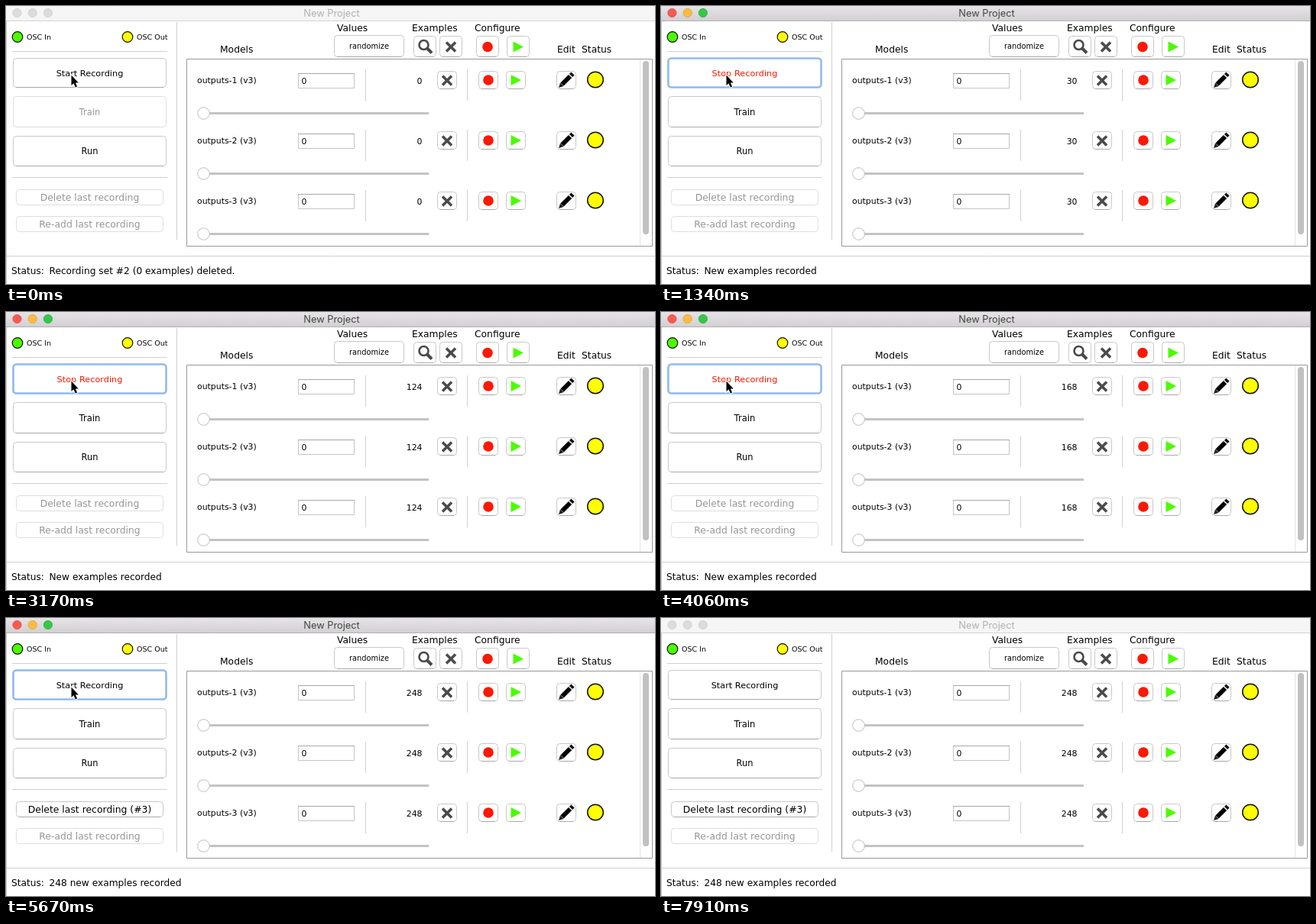
Write an HTML page with a canvas that moves like this. It is 849 by 364 pixels and loops after 8 s.

```html
<!DOCTYPE html>
<html>
<head>
<meta charset="utf-8">
<title>New Project</title>
<style>
  html, body { margin: 0; width: 100%; height: 100%; overflow: hidden; background: #fff; }
  canvas { display: block; }
</style>
</head>
<body>
<canvas id="stage" width="849" height="364"></canvas>
<script>
const ctx = document.getElementById('stage').getContext('2d');
const LOOP = 8000, START = 810, STOP = 5670, FRAME = 88;
const SANS = '"DejaVu Sans", sans-serif', TITLE = 'Inter, sans-serif';
const RED = '#fa1900', GREEN = '#4bfc00', YELLOW = '#ffff00', DARK = '#4a4a4a';

function text(str, x, y, size, color = '#000', align = 'left', family = SANS) {
  ctx.font = `${size}px ${family}`;
  ctx.textAlign = align;
  ctx.fillStyle = color;
  ctx.fillText(str, x, y);
}

function path(points, closed) {
  ctx.beginPath();
  points.forEach(([x, y]) => ctx.lineTo(x, y));
  if (closed) ctx.closePath();
}

function line(x1, y1, x2, y2, color = '#d0d0d0', width = 1) {
  path([[x1, y1], [x2, y2]]);
  ctx.strokeStyle = color;
  ctx.lineWidth = width;
  ctx.stroke();
}

function circle(x, y, r, fill, stroke, width = 1) {
  ctx.beginPath();
  ctx.arc(x, y, r, 0, 2 * Math.PI);
  if (fill) { ctx.fillStyle = fill; ctx.fill(); }
  if (stroke) { ctx.strokeStyle = stroke; ctx.lineWidth = width; ctx.stroke(); }
}

function box(x, y, w, h, r, fill, stroke, width = 1) {
  ctx.beginPath();
  ctx.roundRect(x, y, w, h, r);
  if (fill) { ctx.fillStyle = fill; ctx.fill(); }
  if (stroke) { ctx.strokeStyle = stroke; ctx.lineWidth = width; ctx.stroke(); }
}

function button(x, y, w, h, enabled = true) {
  box(x + .5, y + .5, w - 1, h - 1, 4, '#fff', enabled ? '#c8c8c8' : '#dedede');
  if (enabled) line(x + 4, y + h - .5, x + w - 4, y + h - .5, '#a8a8a8');
}

function labelButton(label, x, y, w, h, size, enabled, color = '#000') {
  button(x, y, w, h, enabled);
  text(label, x + w / 2, y + h / 2 + size * .36, size, enabled ? color : '#959595', 'center');
}

function crossIcon(x, y) {
  line(x - 6, y - 6, x + 6, y + 6, DARK, 3.6);
  line(x + 6, y - 6, x - 6, y + 6, DARK, 3.6);
}

function playIcon(x, y) {
  path([[x - 6.5, y - 7], [x + 7, y], [x - 6.5, y + 7]], true);
  ctx.fillStyle = GREEN;
  ctx.fill();
}

function searchIcon(x, y) {
  circle(x - 1.5, y - 2, 6, null, DARK, 2.6);
  line(x + 3, y + 2.5, x + 9, y + 8.5, DARK, 4);
}

function pencilIcon(x, y) {
  line(x - 5.5, y + 5.5, x + 5, y - 5, '#000', 6);
  line(x + 6, y - 6, x + 8.5, y - 8.5, '#111', 6);
  path([[x - 10, y + 10], [x - 8, y + 3.5], [x - 3.5, y + 8]], true);
  ctx.fillStyle = '#222';
  ctx.fill();
}

function titleBar(active) {
  const shade = ctx.createLinearGradient(0, 0, 0, 19);
  shade.addColorStop(0, active ? '#e6e4e6' : '#f6f6f6');
  shade.addColorStop(1, active ? '#d2d0d2' : '#f5f5f5');
  ctx.fillStyle = shade;
  ctx.fillRect(0, 0, 849, 19);
  line(0, 19.5, 849, 19.5, active ? '#b2b0b2' : '#d4d4d4');
  const lights = active ? ['#fc5753', '#fdbc40', '#34c84a'] : Array(3).fill('#dcdcdc');
  const rims = active ? ['#df4744', '#de9f34', '#27aa35'] : Array(3).fill('#cfcfcf');
  lights.forEach((c, i) => circle(14.5 + 20.2 * i, 9, 5.6, c, rims[i], .8));
  text('New Project', 426, 14, 12.8, active ? '#444' : '#b0b0b0', 'center', TITLE);
}

function header() {
  const labels = [['Models', 280, 61], ['Values', 433, 33], ['Examples', 531, 33],
                  ['Configure', 613, 33], ['Edit', 721, 61], ['Status', 753, 61]];
  labels.forEach(([s, x, y]) => text(s, x, y, 12.3));
  labelButton('randomize', 429, 38, 92, 29, 9.8, true);
  [533, 567, 615, 655].forEach(x => button(x, 39, 30, 28));
  searchIcon(548, 53);
  crossIcon(582, 53.5);
  circle(630, 53.5, 6.8, RED);
  playIcon(670, 53.5);
}

function modelRow(i, count) {
  ctx.save();
  ctx.translate(0, 79 * i);
  text(`outputs-${i + 1} (v3)`, 250, 101, 10.9);
  box(382.5, 88.5, 73, 19, 0, '#fff', '#c4c4c4');
  line(382, 88.5, 456, 88.5, '#a8a8a8');
  text('0', 386.5, 102, 10.9);
  line(470.5, 83, 470.5, 124);
  line(603.5, 83, 603.5, 124);
  text(count, 544.5, 102, 10.9, '#000', 'right');
  [564, 618, 654, 720].forEach(x => button(x, 85, 26, 24));
  crossIcon(577, 97.5);
  circle(631, 97, 6.8, RED);
  playIcon(667, 97);
  pencilIcon(733, 97);
  circle(771, 96.5, 10.3, YELLOW, '#111', 1.5);
  line(258, 140.5, 553, 140.5, '#c3c3c3', 3);
  circle(258.5, 140.5, 7.8, '#fff', '#bdbdbd');
  ctx.restore();
}

function cursor(x, y) {
  path([[0, 0], [0, 13.5], [3, 10.8], [5.3, 16], [7.6, 15], [5.4, 10], [9.3, 10]]
    .map(([dx, dy]) => [x + dx, y + dy]), true);
  ctx.strokeStyle = '#fff';
  ctx.lineWidth = 2;
  ctx.stroke();
  ctx.fillStyle = '#000';
  ctx.fill();
}

// The screen refreshes slightly slower in the second part of the recording.
function recordingStep(t) {
  if (t >= STOP) return 55;
  const i = t < 3436 ? Math.floor((t - 804) / 87.6) : 30 + Math.floor((t - 3436) / 89);
  return Math.max(0, Math.min(54, i));
}

function draw(t) {
  const active = t >= 630 && t < 7910;
  const started = t >= START, done = t >= STOP, recording = started && !done;
  const step = recordingStep(t);
  const count = started ? Math.round(4.45 * step + 3.7) : 0;

  ctx.fillStyle = '#fff';
  ctx.fillRect(0, 0, 849, 364);
  titleBar(active);
  line(.5, 20, .5, 364, '#c4c4c4');

  circle(15, 40.5, 6.8, GREEN, '#111', 1.2);
  text('OSC In', 27, 44, 9.5);
  circle(159, 40.5, 6.8, YELLOW, '#111', 1.2);
  text('OSC Out', 171, 44, 9.5);
  line(8, 59.5, 211, 59.5);
  line(8, 224.5, 211, 224.5);
  line(223.5, 21, 223.5, 306);
  line(0, 327.5, 849, 327.5);

  labelButton(recording ? 'Stop Recording' : 'Start Recording', 9, 68, 201, 39, 11.3, true,
              recording ? RED : '#000');
  if (started && active) box(9.5, 68.5, 200, 38, 4, null, '#8fbaf0', 2.6);
  labelButton('Train', 9, 118, 201, 41, 11.6, started);
  labelButton('Run', 9, 170, 201, 40, 11.4, true);
  labelButton('Delete last recording' + (done ? ' (#3)' : ''), 13, 240, 193, 21, 12.4, done);
  labelButton('Re-add last recording', 13, 275, 193, 21, 12.4, false);

  header();
  box(236.5, 69.5, 609, 245, 0, null, '#999');
  line(829.5, 70, 829.5, 314, '#e4e4e4');
  box(833, 72, 8, 227, 4, '#c1c1c1');
  for (let i = 0; i < 3; i++) {
    const late = recording && i === 0 && step % 15 === 0;
    modelRow(i, late ? count - 1 : count);
  }

  const status = done ? `${count} new examples recorded`
    : started ? 'New examples recorded' : 'Recording set #2 (0 examples) deleted.';
  text('Status:', 7, 351, 12.2);
  text(status, 56.5, 351, 12.2);

  if (t < 7020) cursor(85.5, 90.5);
  else if (t < 7110) cursor(330, 190);
  else if (t < 7200) cursor(713, 339);
}

function tick(now) {
  draw(now % LOOP);
  requestAnimationFrame(tick);
}
draw(0);
requestAnimationFrame(tick);
</script>
</body>
</html>
```
